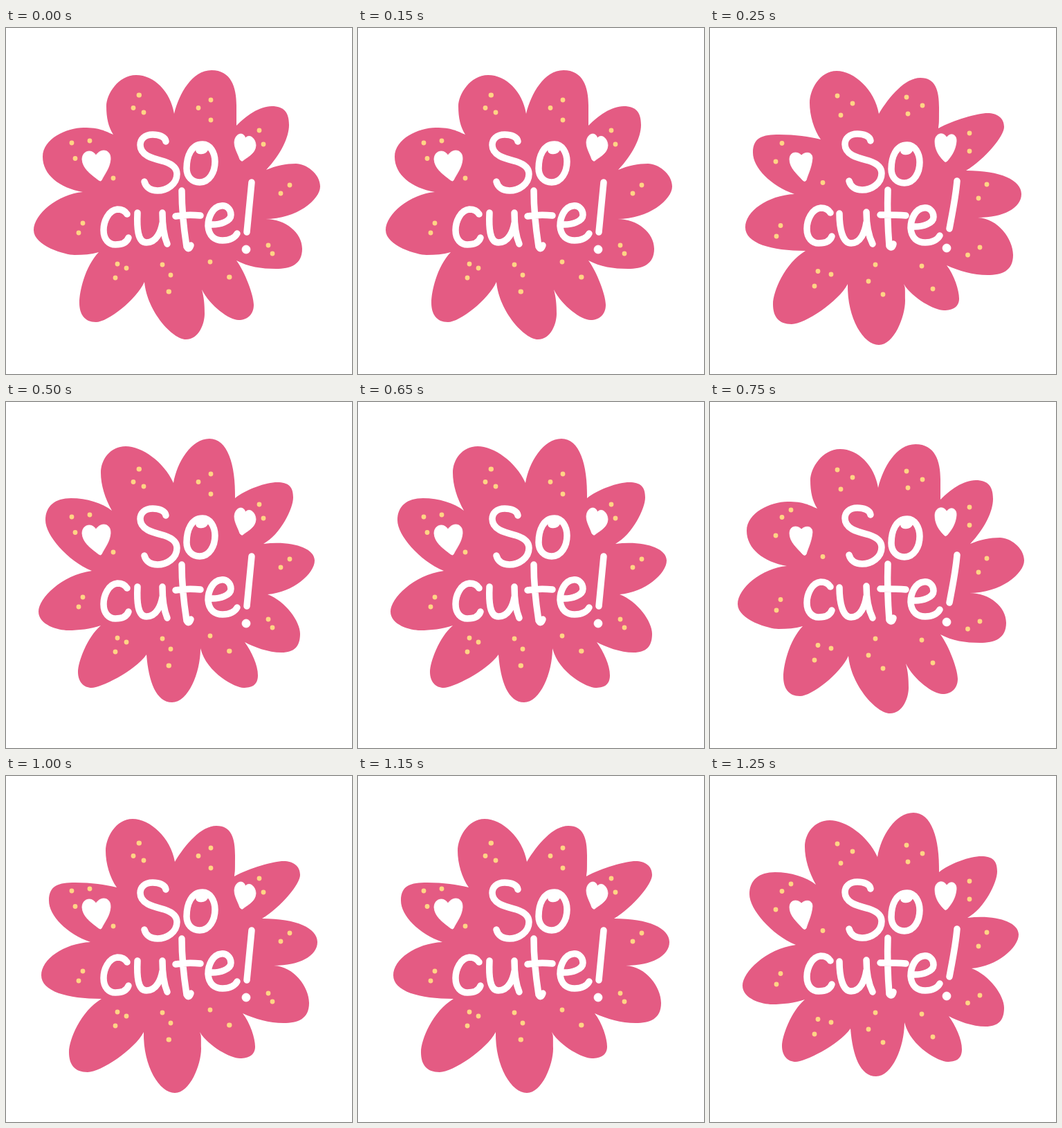
An HTML page without scripts that plays this animation: 500x500 px, repeating every 1500 ms.

```html
<!DOCTYPE html>
<html lang="en">
<head>
<meta charset="utf-8">
<title>So cute!</title>
<style>
  html, body { margin: 0; width: 100%; height: 100%; overflow: hidden; background: #fff; }
  svg { display: block; width: 100%; height: 100%; }

  .flower { fill: #e45b83; animation: third 750ms step-end infinite; }
  .flower.b { animation-delay: -500ms; }
  .flower.c { animation-delay: -250ms; }

  .words { animation: half 500ms step-end infinite; }
  .words.b { animation-delay: -250ms; }

  .ink { fill: none; stroke: #fff; stroke-width: 9.5; stroke-linecap: round; stroke-linejoin: round; }
  .heart { fill: #fff; stroke: #fff; stroke-width: .8; }
  .dots { fill: none; stroke: #ffd485; stroke-width: 6.8; stroke-linecap: round; }
  .late { animation: late 1500ms step-end infinite; }

  @keyframes third { 0% { visibility: visible; } 33.3333%, 100% { visibility: hidden; } }
  @keyframes half { 0% { visibility: visible; } 50%, 100% { visibility: hidden; } }
  @keyframes late { 0% { opacity: 0; } 50%, 100% { opacity: 1; } }
</style>
</head>
<body>
<svg viewBox="0 0 500 500" role="img" aria-label="So cute!">
  <defs>
    <path id="s" d="M231 164C230 157 221 154 212 154C200 154 194 161 194 169C194 185 214 189 229 193C241 197 247 203 247 211C247 226 232 235 219 235C209 235 202 230 200 222"/>
    <path id="o" d="M279 177C288 179 291 172 284 168C268 168 261 185 261 203C261 215 269 223 280 223C294 223 302 208 302 193C302 180 295 168 284 168"/>
    <path id="c" d="M175 269C172 264 167 262 161 262C148 263 141 280 141 292C141 306 149 313 158 313C169 313 175 309 177 303"/>
    <path id="e" d="M294 284C310 285 325 279 325 270C325 261 318 256 311 257C299 258 292 273 292 286C293 301 302 307 313 307C323 307 331 303 334 297"/>
  </defs>

  <!-- petals, clockwise from the upper left -->
  <path class="flower a" d="M155 154
    C148 143 145 130 145 113S162 68 188 68S238 92 243 124
    C250 95 269 61 297 61S333 85 333 112S333 136 333 141
    C347 127 366 113 384 113S409 122 409 140S397 183 376 205
    C390 199 405 196 419 196S454 210 454 229S420 276 375 276
    C404 276 428 296 428 319S411 348 390 348S350 345 333 336
    C345 352 358 386 358 400S349 422 336 422S295 402 283 378
    C286 389 287 399 287 413S279 450 260 450S204 410 200 367
    C188 393 147 425 130 425S106 413 106 397S114 345 134 324
    C123 327 112 328 99 328S40 315 40 292S75 240 111 237
    C77 231 53 212 53 186S88 144 112 144S143 149 155 154Z"/>
  <path class="flower b" d="M160 161
    C150 147 144 126 144 108S158 62 183 62S238 89 244 124
    C259 99 282 72 304 72S331 90 331 115S331 136 330 145
    C352 133 387 123 401 123S425 130 425 143S398 189 370 206
    C420 206 450 220 450 240S424 274 387 274
    C416 275 438 305 438 328S422 357 401 357S360 351 342 343
    C353 357 360 379 360 391S351 408 338 408S293 391 280 370
    C282 376 282 371 282 394S266 458 244 458S198 420 199 370
    C186 395 137 428 118 428S91 417 91 399S108 340 138 322
    C88 322 51 311 51 288S83 242 122 240
    C88 228 62 202 62 180S76 154 100 154S143 157 160 161Z"/>
  <path class="flower c" d="M153 157
    C143 139 137 120 137 102S150 64 173 64S228 86 242 117
    C247 87 268 53 294 53S332 90 331 139
    C347 126 376 116 392 116S415 122 415 138S397 191 372 205
    C410 200 446 210 446 229S415 275 378 278
    C404 288 425 317 425 335S417 362 398 362S358 354 345 347
    C355 361 364 380 364 395S354 413 343 413S290 392 281 356
    C281 392 263 434 240 434S206 404 203 365
    C185 390 136 413 124 413S104 404 104 390S117 340 137 323
    C122 328 105 330 90 330S47 322 47 303S80 250 124 244
    C88 229 57 192 57 171S71 139 94 139S139 146 153 157Z"/>

  <g class="words a">
    <path class="dots" d="M192 97h.6M184 115.500h0M199 122h0M296 104h0M278 115.500h0M296 133h0M366 148h0M372 168h0M95 166h0M121 163h0M100 188.500h0M155 217h0M410 227h0M397 239h0M379 314h0M385 326h0M111 282h0M105 296h0M161 341h0M174 347h0M158 361h0M226 342h0M238 357h0M235 381h.6M295 338h0M322.500 360h.6"/>
    <path class="heart" d="M130 184C137 173 152 175 151 190C150 202 143 210 138 220Q137 222 134 220C124 212 111 204 110 190C110 177 124 174 130 184Z"/>
    <path class="heart" d="M346 159C352 152 361 160 361 170C360 182 349 186 342 192Q340 193 338 190C335 181 330 174 330 165C331 152 343 149 346 159Z"/>
    <g class="ink">
      <use href="#s"/>
      <use href="#o"/>
      <use href="#c"/>
      <path d="M190 267C189 288 190 310 203 310C218 310 224 293 226 282M226 267C226 285 228 300 233 312"/>
      <path d="M254 235C254 262 257 290 261 316Q264 322 267 314M245 272C257 270 269 270 281 271"/>
      <use href="#e"/>
      <path d="M355 223L348 295"/>
    </g>
    <circle class="heart" cx="347" cy="320" r="6"/>
  </g>

  <g class="words b">
    <path class="dots" d="M184 98h0M206 109h0M189 126h0M284 100h0M307 112h0M286 124h0M375 152h0M375 178h0M104 166.500h0M95 193h0M163 223.500h0M400 226h0M388 246h0M390 317h0M372.500 328h0M102 285.500h0M96 301h0M156 351.500h0M175 356h0M151 373h0M239 342h0M229 366h0M250 385h0M306 344h0M322 377h0"/>
    <path class="dots late" d="M117 156h0"/>
    <path class="heart" d="M132 184C138 178 148 179 148 188C147 201 142 210 139 220Q137 223 134 220C126 211 115 202 115 190C115 178 127 178 132 184Z"/>
    <path class="heart" d="M342 158C348 150 357 154 356 164C355 176 349 185 343 192Q340 195 338 192C331 185 325 176 325 164C325 152 337 149 342 158Z"/>
    <g class="ink">
      <use href="#s" x="1" y="-1"/>
      <use href="#o" x="1" y="1"/>
      <use href="#c" x="-1" y="-2"/>
      <path d="M187 268C187 288 191 311 204 311C218 311 224 294 226 281M226 266C226 285 229 300 235 312"/>
      <path d="M257 234C256 262 257 290 259 315Q263 320 265 312M246 270C258 270 272 270 283 271"/>
      <use href="#e" x="-2" y="3"/>
      <path d="M357 221C355 245 350 268 346 290"/>
    </g>
    <circle class="heart" cx="342" cy="318" r="6"/>
  </g>
</svg>
</body>
</html>
```
